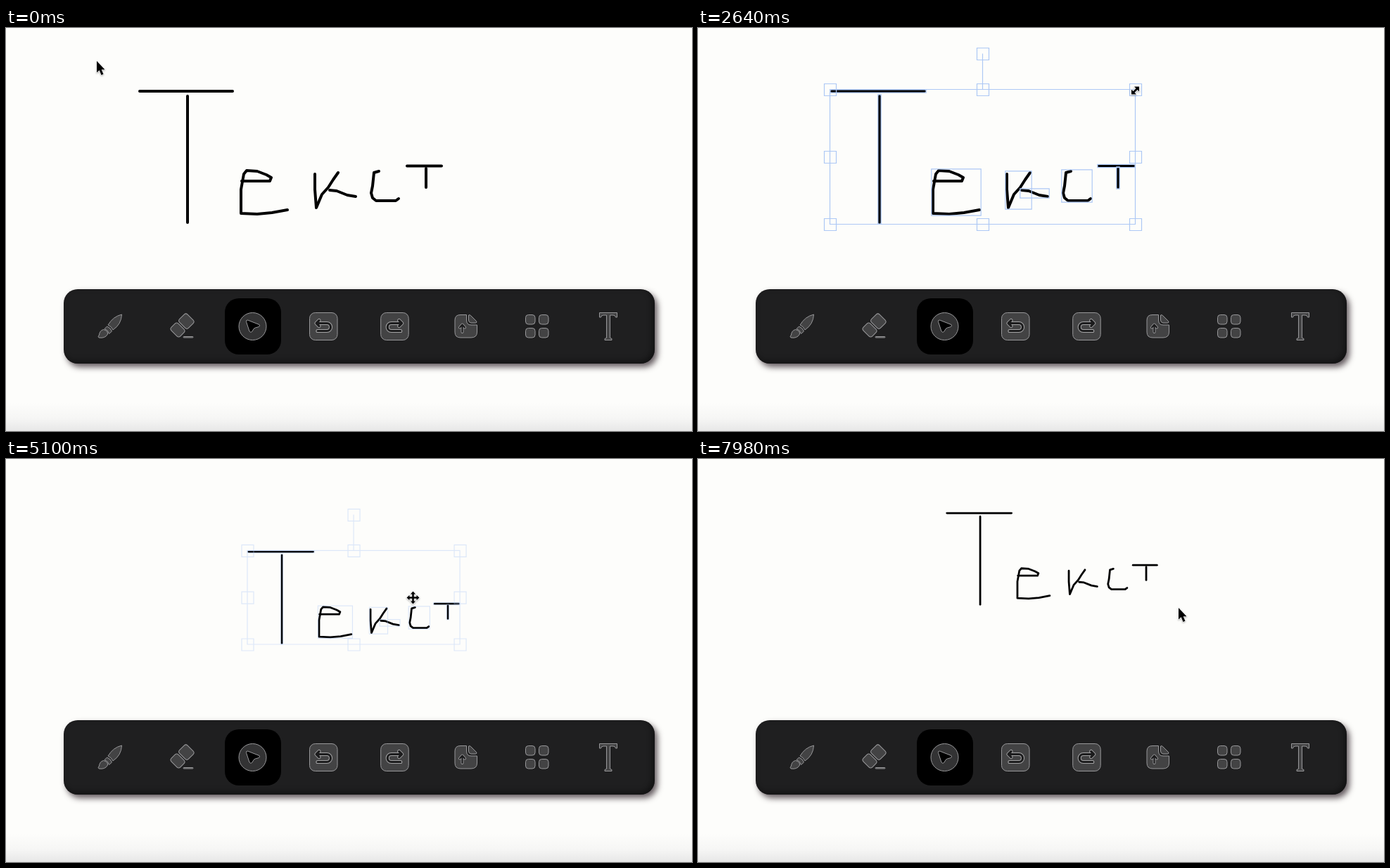
Animation, 975 px wide and 574 px high, one loop 8 s. Source, as an HTML page:

```html
<!DOCTYPE html>
<html lang="en">
<head>
<meta charset="utf-8">
<title>Drawing board</title>
<style>
  html, body { margin: 0; width: 100%; height: 100%; overflow: hidden; }
  body { position: relative; background: linear-gradient(#fdfdfb 534px, #f6f6f5 556px, #e7e7e7 574px); }
  svg { position: absolute; left: 0; top: 0; }
  .bar { position: absolute; left: 82px; top: 372px; width: 840px; height: 106px; border-radius: 20px;
    background: #1f1f20; box-shadow: 4px 5px 9px rgba(50, 38, 44, .75), inset -3px -3px 8px rgba(0, 0, 0, .45); }
  .active { position: absolute; left: 311px; top: 385px; width: 80px; height: 80px; border-radius: 20px; background: #000; }
  .icons { fill: #434344; stroke: #98989a; stroke-width: 1; stroke-linejoin: round; }
  .ink { fill: none; stroke: #000; stroke-width: 4; stroke-linecap: round; stroke-linejoin: round; }
  .frames rect, .ctl { fill: none; stroke: #adc8f5; stroke-width: 1.2; vector-effect: non-scaling-stroke; }
  .pointer { fill: #000; stroke: #fff; stroke-width: 1.3; stroke-linejoin: round; paint-order: stroke;
    filter: drop-shadow(0 1px 1px rgba(0, 0, 0, .3)); }
</style>
</head>
<body>
<div class="bar"></div>
<div class="active"></div>
<svg width="975" height="574" viewBox="0 0 975 574">
  <g class="icons">
    <path d="M164.5 408Q152 411 145 423Q150 425 152 430Q164 422 164.5 408Z"/>
    <path d="M143.500 425Q149 427 150.500 432L146.500 435.500Q145 430 140 428.500Z"/>
    <path d="M138.500 429.500Q145 431 144.500 436Q141 442.500 132 441Q130 440 132.500 437Q133 431 138.500 429.500Z"/>
    <g transform="translate(250 424) rotate(-45)">
      <rect x="1" y="-9" width="16" height="18" rx="3.500"/>
      <rect x="-15.500" y="-9" width="14" height="18" rx="3.500"/>
    </g>
    <rect x="252" y="439.500" width="14" height="1.500" rx=".7"/>
    <circle cx="350.500" cy="425" r="19.500" fill="#333334"/>
    <path fill="#000" d="M343.500 416Q341 416 341.500 418.500L346 432Q348 435 350 432L352 428.500Q354 426.500 358 426Q362 425 360 422.500Z"/>
    <g id="undo">
      <rect x="431.500" y="405.500" width="39.500" height="39" rx="8"/>
      <g fill="none" stroke-linecap="round">
        <path id="hook" d="M442 420.500H456A5.500 5.500 0 0 1 456 431.500H443M445 416.500L441 420.500L445 424.500" stroke="#a5a5a6" stroke-width="5.200"/>
        <path d="M442 420.500H456A5.500 5.500 0 0 1 456 431.500H443M445 416.500L441 420.500L445 424.500" stroke="#1c1c1d" stroke-width="3.200"/>
      </g>
    </g>
    <use href="#undo" transform="translate(1003.700 0) scale(-1 1)"/>
    <path d="M646 408.500H654.500V416Q654.500 423 661 423H669.500V433Q669.500 441 661 441H646Q638 441 638 433V416Q638 408.500 646 408.500Z"/>
    <path d="M657.500 409Q659 408 660.500 409.500L668.500 417.500Q670 419.500 667.500 420H661Q657.500 419.500 657.500 416Z"/>
    <g fill="none" stroke-linecap="round">
      <path d="M648.500 433V423M645 426.500L648.500 422.500L652 426.500" stroke="#98989a" stroke-width="4"/>
      <path d="M648.500 433V423M645 426.500L648.500 422.500L652 426.500" stroke="#1c1c1d" stroke-width="2.200"/>
    </g>
    <rect x="738.500" y="408.500" width="13.500" height="13.500" rx="4"/>
    <rect x="757.500" y="408.500" width="13.500" height="13.500" rx="4"/>
    <rect x="738.500" y="427.500" width="13.500" height="13.500" rx="4"/>
    <rect x="757.500" y="427.500" width="13.500" height="13.500" rx="4"/>
    <path d="M843.500 405.500H868.500V412H866.500Q866 409 863 409H858.500V441.500L861 442.500V444.500H851V442.500L853.500 441.500V409H849Q846 409 845.500 412H843.500Z"/>
  </g>
  <g id="word"><g class="ink" id="ink"></g><g class="frames" id="frames"></g></g>
  <g id="controls"></g>
  <rect id="marquee" fill="rgba(100,100,255,.3)" stroke="rgba(255,255,255,.3)"/>
  <g class="pointer">
    <path id="arrow" d="M0 0V16.500L3.700 13.200L6.500 20L9.500 18.700L6.700 12.200H11.500Z"/>
    <path id="move" d="M0 -9L3.700 -5H1.300V-1.300H5V-3.700L9 0L5 3.700V1.300H1.300V5H3.700L0 9L-3.700 5H-1.300V1.300H-5V3.700L-9 0L-5 -3.700V-1.300H-1.300V-5H-3.700Z"/>
    <path id="resize" d="M5.500 -5.500V1.500L3 -1L-1 3L1.500 5.500H-5.500V-1.500L-3 1L1 -3L-1.500 -5.500Z"/>
  </g>
</svg>
<script>
const $ = id => document.getElementById(id);
const LOOP = 8000, END_SCALE = 0.696;
const BOX = { x: 187.5, y: 87.5, w: 434, h: 192 };
const BOTTOM = BOX.y + BOX.h;

const strokes = [
  '190,90 322,90', '258,97 258,277',
  '335,218 375,218 377,213 370,209 357,204 342,203 338,208 334,230 334,264 357,265 378,263 400,259',
  '439,208 439,230 441,256 449,237 458,227 465,216 472,206',
  '460,231 470,232 485,238 497,240',
  '530,204 523,206 521,225 519,235 521,242 526,246 554,246 558,243',
  '570,196.5 619,196.5', '597,200 597,227'
];
for (const s of strokes) {
  $('ink').innerHTML += `<polyline points="${s}"/>`;
  const pts = s.split(' ').map(p => p.split(',').map(Number));
  const [x, X, y, Y] = [0, 1].flatMap(i => [Math.min(...pts.map(p => p[i])), Math.max(...pts.map(p => p[i]))]);
  $('frames').innerHTML += `<rect x="${x - 2.2}" y="${y - 2.2}" width="${X - x + 4.4}" height="${Y - y + 4.4}"/>`;
}

const smooth = (t, a, b) => {
  const p = Math.min(1, Math.max(0, (t - a) / (b - a)));
  return p * p * (3 - 2 * p);
};
// keys: [start, end, x, y], each easing from the previous point
const travel = (t, x, y, keys) => {
  for (const [a, b, nx, ny] of keys) {
    const p = smooth(t, a, b);
    x += (nx - x) * p;
    y += (ny - y) * p;
  }
  return [x, y];
};
const show = (el, on) => el.style.display = on ? '' : 'none';

function drawControls(x, y, w, h) {
  const cx = x + w / 2, cy = y + h / 2, r = x + w, b = y + h;
  const spots = [[x, y], [cx, y], [r, y], [x, cy], [r, cy], [x, b], [cx, b], [r, b], [cx, y - 51]];
  $('controls').innerHTML = `<path class="ctl" d="M${x} ${y}h${w}v${h}h${-w}ZM${cx} ${y}v-51"/>` +
    spots.map(([u, v]) => `<rect class="ctl" x="${u - 8}" y="${v - 8}" width="17" height="17"/>`).join('');
}

function render(t) {
  const scale = 1 - (1 - END_SCALE) * smooth(t, 3060, 3860);
  const [dx, dy] = travel(t, 0, 0, [[4540, 5100, 155.5, -15.5], [5100, 5340, 160, -19], [5340, 5920, 164.5, -70.5]]);
  const x = BOX.x + dx, w = BOX.w * scale, h = BOX.h * scale, y = BOTTOM + dy - h;
  const selected = t >= 1350 && t < 6800;
  const dragging = t >= 4560 && t < 5960;

  $('word').setAttribute('transform',
    `translate(${x} ${BOTTOM + dy}) scale(${scale}) translate(${-BOX.x} ${-BOTTOM})`);
  drawControls(x, y, w, h);
  for (const id of ['frames', 'controls']) {
    show($(id), selected);
    $(id).style.opacity = dragging ? 0.4 : 1;
  }

  let mx, my;
  if (t < 3060) [mx, my] = travel(t, 129, 47, [[150, 1200, 662, 262], [1800, 2500, 621.5, 89]]);
  else if (t < 3880) [mx, my] = [x + w, y + 1.5];
  else if (t < 4540) [mx, my] = travel(t, 490, 147, [[3880, 4300, 423, 213]]);
  else [mx, my] = travel(t, 423 + dx, 213 + dy, [[6180, 6720, 683, 212]]);

  const dragBox = t > 150 && t < 1350;
  show($('marquee'), dragBox);
  if (dragBox) {
    const m = { x: 129, y: 47, width: mx - 129, height: my - 47 };
    for (const k in m) $('marquee').setAttribute(k, m[k]);
  }

  const onCorner = Math.abs(mx - x - w) < 9 && Math.abs(my - y) < 9;
  const inside = mx > x && mx < x + w && my > y && my < y + h;
  const kind = !selected ? 'arrow' : onCorner ? 'resize' : inside ? 'move' : 'arrow';
  for (const id of ['arrow', 'move', 'resize']) {
    show($(id), id === kind);
    $(id).setAttribute('transform', `translate(${mx} ${my})`);
  }
}

const start = performance.now();
function tick() {
  render((performance.now() - start) % LOOP);
  requestAnimationFrame(tick);
}
tick();
</script>
</body>
</html>
```
